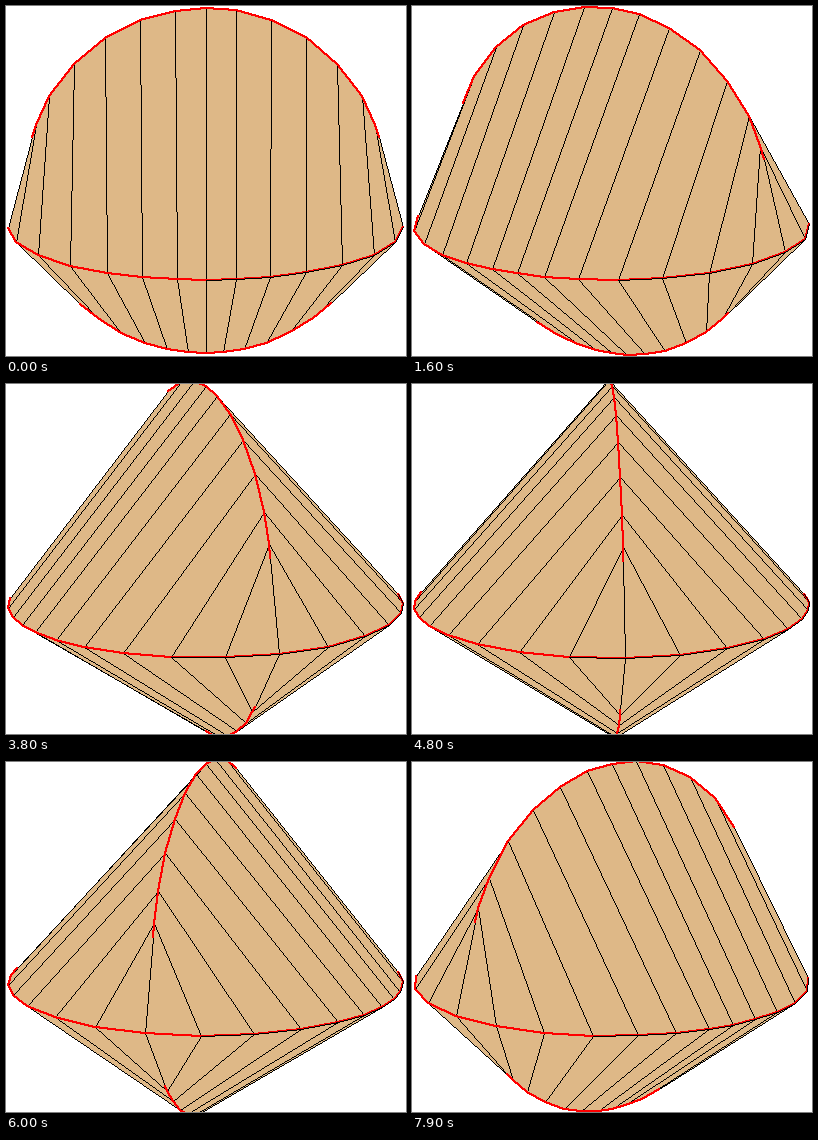
Write an HTML page with a canvas that moves like this. It is 400 by 350 pixels and loops after 8000 ms.

```html
<!DOCTYPE html>
<html lang="en">
<head>
<meta charset="utf-8">
<title>Rotating hull of two circles</title>
<style>
html, body { margin: 0; width: 100%; height: 100%; overflow: hidden; background: #fff; }
canvas { display: block; }
</style>
</head>
<body>
<canvas width="400" height="350"></canvas>
<script>
const FLAT = 197.5, UPRIGHT = 179, LIFT = 48.7; // radii, and height of the upright circle's centre
const TILT = Math.asin(0.2645), CX = 199.5, CY = 221.5, FRONT_X = 208;
const RAD = Math.PI / 180, STEP = 100, LOOP = 8000, TURN = 1.8 * RAD, PHASE = -0.25 * RAD;
const ANGLES = [0, 8.6, 18.9, 30.3, 43.4, 58.15, 73.7, 90];
const N = ANGLES.length - 1;
const ctx = document.querySelector('canvas').getContext('2d');

// One ruling: its ends on the flat and the upright circle share a tangent plane.
function ruling(j, depth, side) {
  const phi = Math.sign(j) * ANGLES[Math.abs(j)] * RAD;
  const s = Math.sin(phi), rise = side * LIFT * s;
  const a = Math.asin(UPRIGHT * s / Math.hypot(FLAT, rise)) + Math.atan(rise / FLAT);
  return {
    flat: [FLAT * s, 0, depth * FLAT * Math.cos(phi)],
    upright: [UPRIGHT * Math.sin(a), LIFT + side * UPRIGHT * Math.cos(a), 0]
  };
}

const quads = [];
for (const depth of [-1, 1]) for (const side of [-1, 1]) for (let j = -N; j < N; j++) {
  const a = ruling(j, depth, side), b = ruling(j + 1, depth, side);
  quads.push({ facing: depth * side, points: [a.upright, b.upright, b.flat, a.flat] });
}

function project([x, y, z], turn) {
  const c = Math.cos(turn), s = Math.sin(turn);
  return [CX + x * c - z * s,
    CY - y * Math.cos(TILT) + (x * s + z * c) * Math.sin(TILT)];
}

function area(points) {
  return points.reduce((sum, [x, y], i) => {
    const [u, v] = points[(i + 1) % points.length];
    return sum + x * v - u * y;
  }, 0);
}

// Hard-edged line made of square dots, without antialiasing.
function line(from, to, color, width) {
  const [x, y] = from.map(Math.round), [u, v] = to.map(Math.round);
  const n = Math.max(Math.abs(u - x), Math.abs(v - y), 1);
  ctx.fillStyle = color;
  for (let i = 0; i <= n; i++) {
    ctx.fillRect(Math.round(x + (u - x) * i / n) + 1 - width,
      Math.round(y + (v - y) * i / n) + 1 - width, width, width);
  }
}

function draw(turn) {
  const faces = quads
    .map(({ facing, points }) => ({ facing, p: points.map(q => project(q, turn)) }))
    .filter(({ facing, p }) => area(p) * facing > 0)
    .map(({ p }) => p);

  ctx.clearRect(0, 0, 400, 350);
  ctx.fillStyle = '#deb887';
  ctx.beginPath();
  for (const p of faces) {
    p.forEach(([x, y], i) =>
      ctx[i ? 'lineTo' : 'moveTo'](Math.round(x) + 0.5, Math.round(y) + 0.5));
    ctx.closePath();
  }
  ctx.fill();

  for (const [a, b, c, d] of faces) {
    line(a, d, '#000', 1);
    line(b, c, '#000', 1);
  }
  for (const [a, b, c, d] of faces) {
    line(a, b, '#f00', 2);
    line(d, c, '#f00', 2);
  }
  for (const [, , c, d] of faces) {
    if (Math.max(c[0], d[0]) > FRONT_X) line(d, c, '#000', 1);
  }
}

const start = performance.now();
function tick() {
  const time = (performance.now() - start) % LOOP;
  draw(Math.floor(time / STEP) * TURN + PHASE);
  requestAnimationFrame(tick);
}
tick();
</script>
</body>
</html>
```
